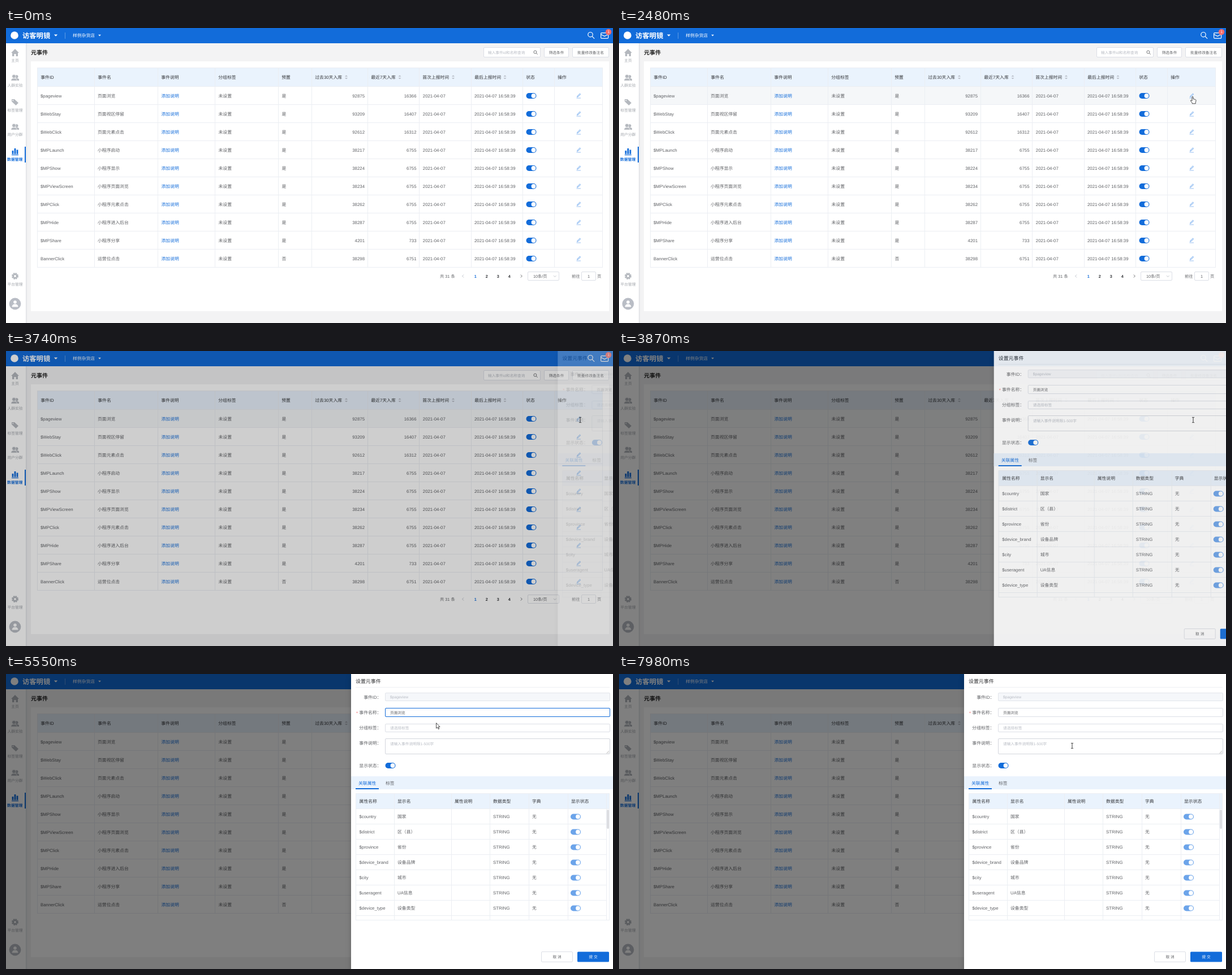
An HTML page for the animation above (8000 ms loop, 1073 by 522 pixels).

```html
<!DOCTYPE html>
<html lang="zh-CN">
<head>
<meta charset="utf-8">
<style>
html, body { margin: 0; width: 100%; height: 100%; overflow: hidden; background: #f3f3f4; }
svg { display: block; }
text { font-family: "Liberation Sans", "Noto Sans CJK SC", "Noto Sans CJK", sans-serif; text-rendering: geometricPrecision; white-space: pre; }
</style>
</head>
<body>
<svg id="stage" width="1073" height="522" viewBox="0 0 1073 522"></svg>
<script>
const BLUE = '#126cda', INK = '#606266', DARK = '#36383c', PALE = '#b8bcc4', LINE = '#ebeef3', EDGE = '#dcdfe6', HEAD = '#eaf3fd';
const S = 6.7, M = 7.82, L = 8.94;

// Drawing helpers; text is placed by its vertical centre
const rect = (x, y, w, h, fill, more = '') => `<rect x="${x}" y="${y}" width="${w}" height="${h}" fill="${fill}" ${more}/>`;
const box = (x, y, w, h, fill = '#fff', edge = EDGE, more = '') => rect(x + .5, y + .5, w - 1, h - 1, fill, `rx="1.5" stroke="${edge}" ${more}`);
const text = (x, y, str, fill = INK, size = M, anchor = 'start', weight = 400) =>
  `<text x="${x}" y="${y + size * .37}" fill="${fill}" font-size="${size}" text-anchor="${anchor}" font-weight="${weight}">${str}</text>`;
const path = (d, fill, stroke = 'none', width = 1, x = 0, y = 0) =>
  `<path d="${d}" fill="${fill}" stroke="${stroke}" stroke-width="${width}" transform="translate(${x} ${y})"/>`;
const circle = (x, y, r, fill, more = '') => `<circle cx="${x}" cy="${y}" r="${r}" fill="${fill}" ${more}/>`;
const group = (id, body, more = '') => `<g id="${id}" ${more}>${body}</g>`;
const each = (list, fn) => list.map(fn).join('');
const toggle = (x, y, fill = BLUE) => rect(x, y - 5, 18, 10, fill, 'rx="5"') + circle(x + 13, y, 3.9, '#fff');
const caret = (x, y) => path('M-3.2-1.6H3.2L0 1.8Z', '#fff', 'none', 1, x, y);
const sorter = x => path('M-2.6-1L0-3.6 2.6-1ZM-2.6 1L0 3.6 2.6 1Z', '#b9bec8', 'none', 1, x, 87);
const lens = (x, y, r, color, width) => circle(x, y, r, 'none', `stroke="${color}" stroke-width="${width}"`) +
  path(`M${r * .7} ${r * .7}L${r * 1.7} ${r * 1.7}`, 'none', color, width, x, y);
const pencil = y => path('M-3.5 4H4M-2.6 2.2L-2 .3 2.4-4 3.8-2.7-.6 1.6Z', '#d3e5fa', '#3f8ae6', .55, 1012, y);

function topBar() {
  return rect(0, 0, 1073, 27, BLUE) + circle(15, 13, 6.8, '#fff') +
    text(29, 13, '访客明镜', '#fff', 12.3, 'start', 700) + caret(88, 13) +
    rect(104, 8, 1, 11, '#5c9ae6') + text(118, 13, '样例杂货店', '#fff', M, 'start', 500) +
    path('M-2.4-1.2H2.4L0 1.4Z', '#fff', 'none', 1, 165.5, 13) + lens(1033, 11.7, 4.2, '#fff', 1.2) +
    rect(1051.6, 8.6, 13, 9.8, 'none', 'rx="1.5" stroke="#fff" stroke-width="1.2"') +
    path('M1052 11.5L1058 14.5 1064 11.5', 'none', '#fff', 1.2) +
    circle(1065, 7, 5.2, '#f56c6c') + text(1065, 7, '1', '#fff', S, 'middle');
}

function sideBar() {
  const grey = '#b4b8be';
  const people = y => circle(18.8, y - 2, 2.7, grey) + path('M13 5Q14 1 19 1T23 5Z', grey, 'none', 1, 0, y) +
    circle(14, y - 2.4, 3.3, grey, 'stroke="#fff" stroke-width=".7"') + path('M8.8 5.3Q9 .8 14 .8T19.4 5.3Z', grey, '#fff', .7, 0, y);
  const labels = [['主页', 57], ['人群实验', 101], ['标签管理', 145], ['用户分群', 188], ['平台管理', 453]];
  return rect(35, 27, 1, 495, '#dfe1e5') + rect(36, 27, 1.5, 495, '#eaebed') + rect(0, 27, 35, 495, '#fff') +
    path('M16 37L23 44H21V50H17.6V46H14.4V50H11V44H9Z', grey) + people(88) +
    path('M10 126H15L22 132.5 17.5 137 10 130Z', grey) + circle(12.3, 128.2, 1, '#fff') + people(175) +
    path('M10 224.5H22', 'none', BLUE, 1.3) + rect(10.6, 217, 2.8, 6, BLUE) + rect(14.6, 213, 2.8, 10, BLUE) + rect(18.6, 215.5, 2.8, 7.5, BLUE) +
    text(15.7, 232.5, '数据管理', BLUE, 6.8, 'middle', 700) + rect(33, 210, 2, 28, BLUE) +
    circle(16, 439, 3.2, 'none', `stroke="${grey}" stroke-width="2.6"`) +
    circle(16, 439, 5, 'none', `stroke="${grey}" stroke-width="2" stroke-dasharray="2.6 1.33"`) +
    each(labels, ([s, y]) => text(16, y, s, '#a3a7ad', 6.8, 'middle')) +
    circle(16, 488, 10.4, '#b9bdc5') + circle(16, 485, 2.8, '#fff') + path('M10.5 493.5Q11 488.5 16 488.5T21.5 493.5Z', '#fff');
}

function eventTable() {
  const rows = [
    ['$pageview', '页面浏览', 92875, 16366], ['$WebStay', '页面视区停留', 93209, 16407],
    ['$WebClick', '页面元素点击', 92612, 16312], ['$MPLaunch', '小程序启动', 38217, 6755],
    ['$MPShow', '小程序显示', 38224, 6755], ['$MPViewScreen', '小程序页面浏览', 38234, 6755],
    ['$MPClick', '小程序元素点击', 38262, 6755], ['$MPHide', '小程序进入后台', 38287, 6755],
    ['$MPShare', '小程序分享', 4201, 733], ['BannerClick', '运营位点击', 38298, 6751]];
  const cols = [55, 156, 268, 369, 481, 540, 639, 730, 822, 913, 969, 1054];
  const heads = ['事件ID', '事件名', '事件说明', '分组标签', '预置', '过去30天入库', '最近7天入库', '首次上报时间', '最后上报时间', '状态', '操作'];
  return rect(55, 71, 1000, 33, HEAD) +
    each(rows, (_, i) => rect(55, 104 + i * 32, 1000, 32, '#f5f7f9', 'class="hover" opacity="0"') + rect(55, 135 + i * 32, 1000, 1, LINE)) +
    rect(55, 70, 1000, 1, LINE) + rect(55, 103, 1000, 1, LINE) + each(cols, x => rect(x, 71, 1, 353, LINE)) +
    each(heads, (s, i) => text(cols[i] + 6.3, 87, s, DARK)) + each([601.5, 696, 790.5, 882], sorter) +
    each(rows, ([id, name, month, week], i) => {
      const y = 120 + i * 32;
      return text(61, y, id) + text(162, y + .5, name) + text(274.5, y, '添加说明', BLUE) + text(375.5, y, '未设置') +
        text(487.5, y, i < 9 ? '是' : '否') + text(634, y, month, INK, M, 'end') + text(725.5, y, week, INK, M, 'end') +
        text(736.8, y, '2021-04-07') + text(828, y, '2021-04-07 16:58:39') + toggle(919.5, y) + `<g class="pen">${pencil(y)}</g>`;
    });
}

function pager() {
  const y = 439, P = 7.27;
  return text(767, y, '共 31 条', INK, P) + path('M809 436.5L806.5 439 809 441.5', 'none', PALE, .9) +
    each([1, 2, 3, 4], n => text(809.7 + n * 20, y, n, n == 1 ? BLUE : DARK, P, 'middle', 700)) +
    path('M909.8 436.5L912.3 439 909.8 441.5', 'none', INK, .9) +
    box(922, 431, 56, 16) + text(932, y + .5, '10条/页', INK, P) + path('M968 438L970.3 440.5 972.6 438', 'none', PALE, .8) +
    text(1000, y + .5, '前往', INK, P) + box(1017, 431, 26, 16) + text(1030, y + .5, '1', INK, P, 'middle') + text(1045, y + .5, '页', INK, P);
}

function page() {
  return rect(0, 0, 1073, 522, '#f3f3f4') + rect(44, 59, 1022, 442, '#fff') +
    text(44, 43, '元事件', '#222', 10.06, 'start', 700) +
    box(844, 34, 101, 18) + text(852, 43.5, '输入事件id和名称查询', PALE, S) + lens(935.4, 42.6, 2.5, INK, .9) +
    box(951, 34, 44, 18) + text(973, 43.5, '筛选条件', INK, S, 'middle') +
    box(1001, 34, 65, 18) + text(1033.5, 43.5, '批量修改备注名', INK, S, 'middle') +
    eventTable() + pager() + sideBar() + topBar();
}

function drawer() {
  const rows = [['$country', '国家'], ['$district', '区（县）'], ['$province', '省份'], ['$device_brand', '设备品牌'],
    ['$city', '城市'], ['$useragent', 'UA信息'], ['$device_type', '设备类型']];
  const cols = [618, 686, 787, 855, 924, 993];
  const heads = ['属性名称', '显示名', '属性说明', '数据类型', '字典', '显示状态'];
  const labels = [['事件ID：', 41], ['事件名称：', 68], ['分组标签：', 95.5], ['事件说明：', 122.5], ['显示状态：', 162]];
  return rect(610, 0, 463, 522, '#fff', 'style="filter:drop-shadow(0 4px 5px #0003)"') +
    text(618, 12.5, '设置元事件', '#303133', L, 'start', 500) + rect(618, 23, 449, 1, '#eef0f3') +
    each(labels, ([s, y]) => text(663.4, y, s, INK, M, 'end')) + text(619, 69, '*', '#f56c6c') +
    box(670, 33, 398, 15, '#f5f7fa', '#e2e5eb') + text(679, 41, '$pageview', PALE, S) +
    box(670, 60, 398, 16) + box(670, 60, 398, 16, 'none', BLUE, 'id="focus"') + text(679, 68.3, '页面浏览', INK, S) +
    rect(706, 63, 1, 10, '#333', 'id="caret"') +
    box(670, 88, 398, 15) + text(679, 95.5, '请选择标签', PALE, S) +
    box(670, 114, 398, 28, '#fff', '#d3d6dd') + text(679, 124, '请输入事件说明限1-500字', PALE, S) +
    path('M1061.5 140.5L1066 136M1064 140.5L1066 138.5', 'none', '#888', .6) + toggle(670.5, 162) +
    rect(610, 181, 463, 23, HEAD) + text(623, 193, '关联属性', BLUE) + text(671, 193, '标签') + rect(618, 202, 41, 2, BLUE) +
    rect(618, 212, 449, 27, HEAD) + each([211, 238, 435], y => rect(618, y, 449, 1, LINE)) +
    each(rows, (_, i) => rect(618, 265 + i * 27, 443, 1, LINE)) +
    each([...cols, 1061], x => rect(x, 212, 1, 224, LINE)) + rect(1066, 212, 1, 224, LINE) +
    each(heads, (s, i) => text(cols[i] + (i ? 6 : 6.6), 225.5, s, DARK)) +
    each(rows, ([id, name], i) => {
      const y = 252.5 + i * 27;
      return text(624.5, y, id) + text(692, y, name) + text(861, y, 'STRING') + text(930, y, '无') + toggle(998, y, '#6ca4ea');
    }) +
    rect(1062, 240, 4, 34, '#dddee1', 'rx="2"') +
    box(946, 491, 56, 19) + text(974, 501, '取 消', INK, S, 'middle') +
    rect(1010, 491.5, 56, 18, BLUE, 'rx="1.5"') + text(1038, 501, '提 交', '#fff', S, 'middle', 500);
}

const popup = () => rect(671, 110, 141, 182, '#fff', 'rx="2" style="filter:drop-shadow(0 1px 3px #0003)"') +
  text(678.5, 268.5, '添加分组标签', BLUE) + rect(775, 259, 30, 18, BLUE, 'rx="1.5"') + text(789.7, 268.5, '确定', '#fff', S, 'middle', 700);

const pointers = {
  arrow: path('M0 0V9.5L2.2 7.5 3.7 11 5.2 10.4 3.7 6.9H6.5Z', '#fff', '#222', .8),
  hand: path('M-1 1Q0-.6 1 1V4.6L4.6 5.4Q6.3 5.8 6 8L5.2 10.6V12.8H-.8V11.4L-3.6 7.9Q-3.6 6.2-2.2 6.8L-1 8Z', '#fff', '#222', .8),
  beam: path('M-2-4.6H-.6L0-4.2 .6-4.6H2M0-4.2V4.2M-2 4.6H-.6L0 4.2 .6 4.6H2', 'none', '#222', .9)
};

const $ = id => document.getElementById(id);
$('stage').innerHTML = page() + rect(0, 0, 1073, 522, '#000', 'id="shade"') + group('drawer', drawer()) +
  group('popup', popup()) + group('cursor', each(Object.keys(pointers), k => group(k, pointers[k])));
const hovers = [...document.querySelectorAll('.hover')], pen = document.querySelector('.pen');

// Pointer route: time, x, y
const route = [[0, 955, 540], [89, 955, 540], [90, 958, 516], [600, 1018, 310], [870, 1004, 198], [1450, 1003, 140],
  [1600, 1003, 107], [1690, 1004, 116], [2150, 1014, 121], [3549, 1014, 121], [3550, 1015, 122], [4130, 1015, 122],
  [4360, 830, 62], [4680, 770, 69], [5380, 770, 69], [5650, 755, 97], [6870, 755, 97], [7240, 858, 150],
  [7610, 858, 150], [7980, 801, 127], [8000, 801, 127]];
const clamp = v => Math.max(0, Math.min(1, v));
const ramp = (t, from, span) => clamp((t - from) / span);

function pointerAt(t) {
  const i = Math.max(1, route.findIndex(k => k[0] >= t));
  const [t0, x0, y0] = route[i - 1], [t1, x1, y1] = route[i];
  const p = clamp((t - t0) / (t1 - t0));
  return [x0 + (x1 - x0) * p, y0 + (y1 - y0) * p];
}

// The CSS "ease" curve, cubic-bezier(.25, .1, .25, 1)
function ease(x) {
  const curve = (a, b, u) => 3 * a * u * (1 - u) ** 2 + 3 * b * u * u * (1 - u) + u ** 3;
  let lo = 0, hi = 1;
  for (let i = 0; i < 20; i++) {
    const mid = (lo + hi) / 2;
    if (curve(.25, .25, mid) < x) lo = mid; else hi = mid;
  }
  return curve(.1, 1, lo);
}

const rowAt = t => t < 0 || t > 3740 ? -1 : Math.floor((pointerAt(t)[1] - 104) / 32);

function draw(t) {
  // A row tint trails the pointer over 250 ms
  const tint = Array(10).fill(0);
  for (let k = 0; k < 10; k++) {
    const row = rowAt(t - k * 25);
    if (row in tint) tint[row] += .1;
  }
  hovers.forEach((h, i) => h.setAttribute('opacity', tint[i]));
  pen.setAttribute('opacity', t >= 2340 && t < 2480 ? .6 : 1);

  // The shade darkens faster than the drawer slides and fades in
  const shown = t >= 3735, open = shown ? ease(ramp(t, 3692, 296)) : 0;
  $('shade').setAttribute('opacity', shown ? ease(ramp(t, 3692, 200)) / 2 : 0);
  $('drawer').setAttribute('opacity', open);
  $('drawer').setAttribute('transform', `translate(${463 * (1 - open)})`);
  $('focus').setAttribute('opacity', ramp(t, 4830, 200) - ramp(t, 6200, 200));
  $('caret').setAttribute('opacity', (t >= 4860 && t < 5410) || (t >= 5930 && t < 6200) ? 1 : 0);
  $('popup').setAttribute('opacity', ramp(t, 6450, 200) - ramp(t, 7410, 200));

  const [x, y] = pointerAt(t);
  const inField = (y > 60 && y < 76) || (y > 114 && y < 142);
  const shape = t < 3550 ? (x > 1007 && y < 125 ? 'hand' : 'arrow') : inField ? 'beam' : 'arrow';
  for (const k in pointers) $(k).setAttribute('visibility', k == shape ? 'visible' : 'hidden');
  $('cursor').setAttribute('transform', `translate(${x} ${y})`);
}

let start;
function tick(now) {
  start ??= now;
  draw((now - start) % 8000);
  requestAnimationFrame(tick);
}
draw(0);
requestAnimationFrame(tick);
</script>
</body>
</html>
```
